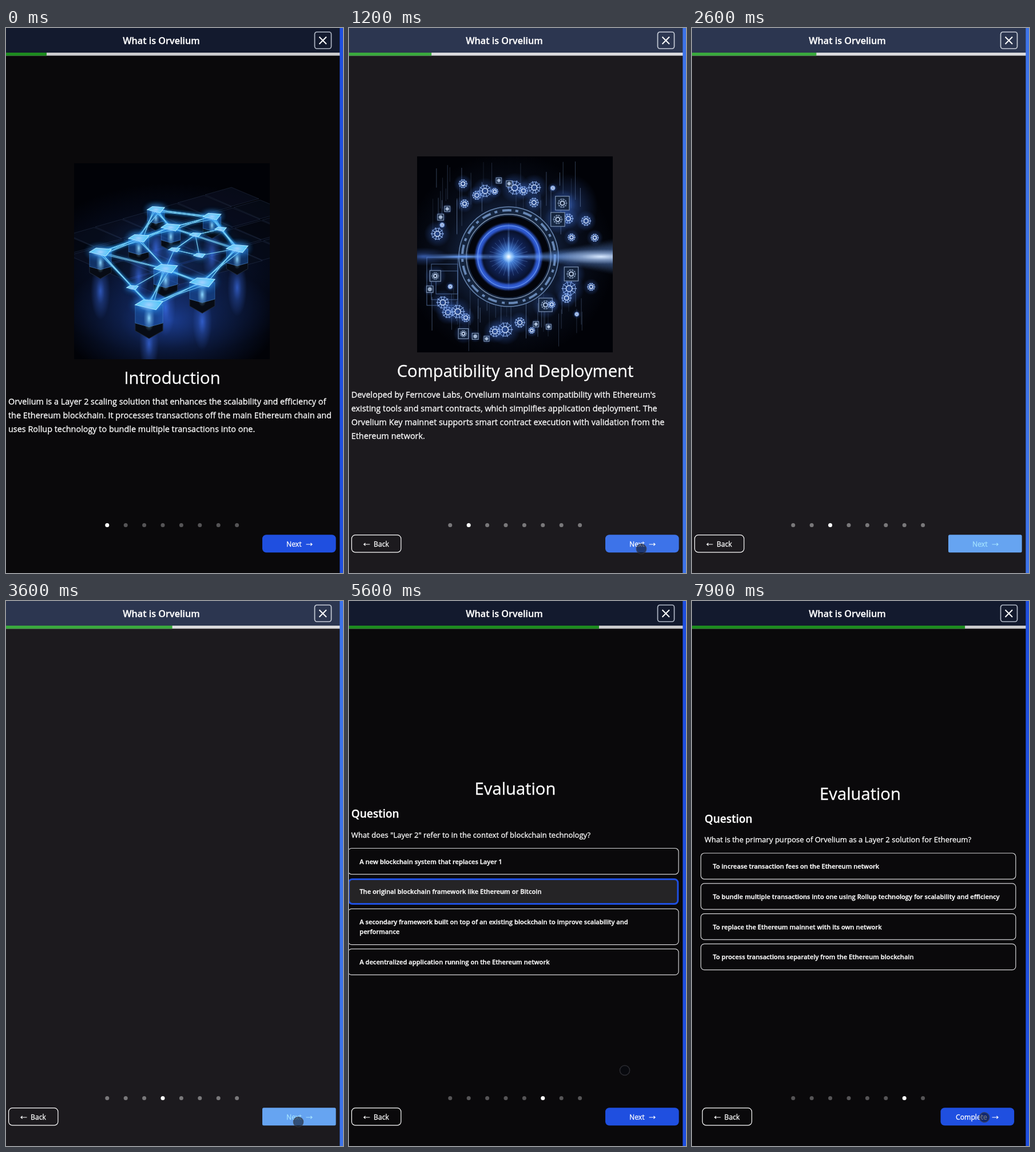
These frames come from a looping animation (589x951 px, 8000 ms). An HTML page with a canvas:

```html
<!DOCTYPE html>
<html lang="en">
<head>
<meta charset="utf-8">
<title>Lesson slides</title>
<style>
html, body { margin: 0; width: 589px; height: 951px; overflow: hidden; }
body { position: relative; background: var(--bg); font-family: "Open Sans", "Noto Sans", sans-serif; }
.slide { position: absolute; left: 0; top: 0; width: 589px; height: 951px; }
.slide canvas { position: absolute; }
svg { position: absolute; left: 0; top: 0; --ink: #fff; }
text { fill: var(--ink); stroke: var(--ink); stroke-width: .3; font-size: 12.2px; }
.title { font-size: 16.2px; font-weight: 600; text-anchor: middle; }
.heading { font-size: 29.2px; text-anchor: middle; }
.body { font-size: 14.42px; }
.sub { font-size: 19px; font-weight: 600; }
.ask { font-size: 13.06px; }
.choice { font-size: 11.15px; font-weight: 600; }
.box { fill: none; stroke: #d4d4d6; stroke-width: 1.2; }
.picked { fill: #252426; stroke: var(--blue); stroke-width: 3; }
.line { fill: none; stroke: var(--ink); stroke-width: 1.2; }
.button { fill: var(--blue); rx: 7px; }
.wait { --ink: #a4e2ff; }
.wait .button { fill: #66a4f1; rx: 2.5px; }
</style>
</head>
<body>
<div class="slide" id="intro"></div>
<div class="slide" id="deploy"></div>
<div class="slide" id="quiz1"></div>
<div class="slide" id="quiz2"></div>
<svg id="ui" width="589" height="951"></svg>
<script>
const $ = id => document.getElementById(id);
const svg = s => `<svg width="589" height="951">${s}</svg>`;
const text = (cls, x, y, s) => `<text class="${cls}" x="${x}" y="${y}">${s}</text>`;
const arrow = (x, dir) => `<path class="line" d="M${x} 901h${10.5 * dir}m${-2.6 * dir} -2.3l${2.6 * dir} 2.3l${-2.6 * dir} 2.3"/>`;
const mix = (a, b, k) => a + (b - a) * k;
const ramp = (t, a, b) => Math.min(1, Math.max(0, (t - a) / (b - a)));
const randomizer = seed => () => (seed = seed * 16807 % 2147483647) / 2147483647;

// ---------- pictures ----------
function picture(top, draw) {
  const c = document.createElement('canvas');
  c.width = c.height = 342;
  c.style.left = '119px';
  c.style.top = top + 'px';
  const g = c.getContext('2d');
  g.fillStyle = '#010207';
  g.fillRect(0, 0, 342, 342);
  g.translate(-119, -top);
  draw(g);
  return c;
}

function glow(g, x, y, rx, ry, color, alpha) {
  g.save();
  g.translate(x, y);
  g.scale(rx, ry);
  const r = g.createRadialGradient(0, 0, 0, 0, 0, 1);
  r.addColorStop(0, `rgba(${color},${alpha})`);
  r.addColorStop(.45, `rgba(${color},${alpha * .4})`);
  r.addColorStop(1, `rgba(${color},0)`);
  g.fillStyle = r;
  g.fillRect(-1, -1, 2, 2);
  g.restore();
}

function poly(g, pts, fill, line) {
  g.beginPath();
  pts.forEach(p => g.lineTo(...p));
  g.closePath();
  if (fill) { g.fillStyle = fill; g.fill(); }
  if (line) { g.strokeStyle = line; g.stroke(); }
}

function ring(g, x, y, r, color, width) {
  g.beginPath();
  g.arc(x, y, r, 0, 7);
  g.strokeStyle = color;
  g.lineWidth = width;
  g.stroke();
}

function segment(g, x1, y1, x2, y2) {
  g.beginPath();
  g.moveTo(x1, y1);
  g.lineTo(x2, y2);
  g.stroke();
}

// Spokes between two radii
function burst(g, x, y, from, to, count) {
  for (let i = 0; i < count; i++) {
    const c = Math.cos(i * 2 * Math.PI / count), s = Math.sin(i * 2 * Math.PI / count);
    segment(g, x + c * from, y + s * from, x + c * to, y + s * to);
  }
}

const points = s => s.split(' ').map(p => p.split(',').map(Number));
const towers = points('262,317 360,329 288,348 232,367 404,385 165,391 279,420 343,444 250,483');
const chips = points('375,351 331,361 294,387 338,397 221,453');

// Distance on the tilted floor
const distance = (p, q) => Math.hypot(p[0] - q[0], 1.6 * (p[1] - q[1]));
const nearest = (p, group) => [...group].sort((a, b) => distance(p, a) - distance(p, b)).slice(1, 4);

function drawNetwork(g) {
  const rnd = randomizer(7);
  // floor
  glow(g, 290, 420, 250, 150, '22,48,115', .7);
  g.lineWidth = 1;
  for (let i = 0; i < 7; i++) for (let j = 0; j < 4; j++) {
    const x = 60 + i * 48 + j * 50, y = 375 - i * 14 + j * 22, v = rnd();
    poly(g, [[x, y], [x + 46, y - 13], [x + 94, y + 7], [x + 46, y + 20]],
      `rgba(${4 + v * 6},${7 + v * 9},${15 + v * 18},.7)`, 'rgba(75,95,130,.25)');
  }
  glow(g, 285, 510, 190, 110, '34,76,180', .75);
  glow(g, 290, 385, 130, 70, '30,80,170', .45);
  towers.forEach(([x, y]) => glow(g, x, y + 68, 17, 50, '65,120,255', .65));
  // columns
  towers.forEach(([x, y]) => {
    const w = 15 + (y - 317) * .055, h = w * 1.6, d = w * .28, base = y + h;
    poly(g, [[x - w, base - d], [x, base], [x + w, base - d], [x + w, base + d], [x, base + 3 * d], [x - w, base + d]], '#070b14', '#202b3d');
    poly(g, [[x - w, y], [x + w, y], [x + w, base - d], [x, base], [x - w, base - d]], 'rgba(25,80,160,.55)', 'rgba(80,150,225,.45)');
    glow(g, x, y + h * .6, w * .4, h * .6, '140,215,255', 1);
  });
  // links
  g.shadowColor = '#2fa5ff';
  g.shadowBlur = 5;
  g.lineWidth = 1.2;
  g.strokeStyle = '#84d7f6';
  const link = (p, q) => segment(g, ...p, ...q);
  towers.forEach(p => nearest(p, towers).forEach(q => {
    link(p, q);
    segment(g, p[0] + 6, p[1] + 4, q[0] - 4, q[1]);
  }));
  chips.forEach(p => nearest(p, [...towers, ...chips]).forEach(q => link(p, q)));
  // plates
  [...towers, ...chips].forEach(([x, y], i) => {
    const a = i < towers.length ? 15 + (y - 317) * .055 : 10, d = a * .36;
    g.shadowBlur = 12;
    poly(g, [[x - a, y], [x - a * .4, y - d], [x + a, y - d * .7], [x + a * .5, y + d]], '#63d5f5', '#b4f3ff');
    g.shadowBlur = 0;
    glow(g, x, y, a * .8, d * 1.3, '235,255,255', 1);
    glow(g, x, y, a * 1.6, a, '50,140,255', .4);
  });
}

function mark(g, x, y, r, framed) {
  glow(g, x, y, r * 2, r * 2, '60,110,215', .65);
  g.lineWidth = 1.2;
  g.strokeStyle = framed ? '#7d92b2' : '#8db0ee';
  if (framed) {
    g.fillStyle = '#14233b';
    g.fillRect(x - r, y - r, 2 * r, 2 * r);
    g.strokeRect(x - r, y - r, 2 * r, 2 * r);
    r *= .7;
  }
  burst(g, x, y, r * .4, r, 10);
  ring(g, x, y, r * .85, g.strokeStyle, 1);
  ring(g, x, y, r * .4, '#cfe0fa', 1.5);
}

function drawPortal(g) {
  const cx = 279, cy = 399, rnd = randomizer(41);
  glow(g, cx, cy, 185, 180, '42,72,130', .6);
  glow(g, 385, 310, 50, 55, '60,110,220', .5);
  // hanging threads
  for (let i = 0; i < 66; i++) {
    const x = 145 + rnd() * 267, y = i % 2 ? 232 + rnd() * 70 : 450 + rnd() * 50;
    g.strokeStyle = `rgba(125,155,200,${.15 + rnd() * .35})`;
    g.lineWidth = 1;
    segment(g, x, y, x, y + 18 + rnd() * 50);
  }
  g.strokeStyle = '#4a658e';
  for (let i = 0; i < 3; i++) g.strokeRect(136 + i * 8, 400 + i * 12, 54 - i * 8, 84 - i * 22);
  // emblems spread around the portal
  for (let i = 0; i < 52; i++) {
    const a = i * 2.4, r = 104 + 52 * rnd(), size = 4 + 10 * rnd() ** 1.5;
    const x = cx + r * Math.cos(a), y = cy + r * Math.sin(a);
    if (Math.abs(y - cy) > 30) mark(g, x, y, size, i % 3 === 0);
  }
  // portal
  glow(g, cx, cy, 112, 112, '50,90,160', .7);
  ring(g, cx, cy, 79, '#15243d', 16);
  ring(g, cx, cy, 87, '#6683ad', 1.6);
  g.setLineDash([16, 7, 5, 9]);
  ring(g, cx, cy, 81, '#6787b5', 4);
  g.setLineDash([]);
  ring(g, cx, cy, 74, '#8094b0', 1.3);
  g.fillStyle = '#02040b';
  g.beginPath();
  g.arc(cx, cy, 71, 0, 7);
  g.fill();
  for (let i = 0; i < 8; i++) ring(g, cx, cy, 47 + i * 1.6, `rgba(55,105,240,${.15 + .45 * Math.sin(i / 7 * Math.PI)})`, 4);
  ring(g, cx, cy, 54, '#6f9cf0', 1.2);
  glow(g, cx, cy, 56, 56, '45,95,235', 1);
  // beam widening to the right
  for (let x = cx; x < 480; x += 6) {
    const k = (x - cx) / 200;
    glow(g, x, cy, 16, 3 + 34 * k ** 1.4, '110,165,255', .35);
  }
  glow(g, 440, cy, 80, 13, '215,232,255', 1);
  glow(g, 200, cy, 95, 6, '110,165,255', 1);
  glow(g, 130, cy, 45, 16, '70,120,230', .6);
  // flare
  g.strokeStyle = 'rgba(140,190,255,.4)';
  g.lineWidth = .7;
  burst(g, cx, cy, 0, 34, 24);
  glow(g, cx, cy, 3, 62, '130,180,255', .9);
  glow(g, cx, cy, 28, 28, '110,190,255', 1);
  glow(g, cx, cy, 11, 11, '255,255,255', 1);
}

// ---------- slides ----------
function article(id, top, draw, heading, lines) {
  const y = top + 385;
  $(id).innerHTML = svg(text('heading', 290.5, y, heading) +
    lines.map((s, i) => text('body', 4, y + 36 + i * 24, s)).join(''));
  $(id).prepend(picture(top, draw));
}

article('intro', 236, drawNetwork, 'Introduction', [
  'Orvelium is a Layer 2 scaling solution that enhances the scalability and efficiency of',
  'the Ethereum blockchain. It processes transactions off the main Ethereum chain and',
  'uses Rollup technology to bundle multiple transactions into one.'
]);
article('deploy', 224, drawPortal, 'Compatibility and Deployment', [
  "Developed by Ferncove Labs, Orvelium maintains compatibility with Ethereum's",
  'existing tools and smart contracts, which simplifies application deployment. The',
  'Orvelium Key mainnet supports smart contract execution with validation from the',
  'Ethereum network.'
]);

function quiz(id, mid, y, textX, box, question, choices, picked) {
  let top = y + 93.5, out = '';
  choices.forEach((c, i) => {
    const lines = c.split('|'), h = 45.3 + (lines.length - 1) * 17.2;
    const inset = i === picked ? 1.2 : 0;
    out += `<rect class="box ${inset ? 'picked' : ''}" x="${box.x + inset}" y="${top + inset}"
      width="${box.w - 2 * inset}" height="${h - 2 * inset}" rx="6"/>`;
    lines.forEach((s, n) => out += text('choice', textX + 14.5, top + 27 + n * 17, s));
    top += h + 7.5;
  });
  $(id).innerHTML = svg(text('heading', mid, y, 'Evaluation') + text('sub', textX, y + 40.3, 'Question') +
    text('ask', textX, y + 74.6, question) + out);
}

quiz('quiz1', 290.5, 338, 4, { x: -1.5, w: 577.5 },
  'What does "Layer 2" refer to in the context of blockchain technology?', [
    'A new blockchain system that replaces Layer 1',
    'The original blockchain framework like Ethereum or Bitcoin',
    'A secondary framework built on top of an existing blockchain to improve scalability and|performance',
    'A decentralized application running on the Ethereum network'
  ], 1);
quiz('quiz2', 294, 346.5, 22, { x: 15.5, w: 550.3 },
  'What is the primary purpose of Orvelium as a Layer 2 solution for Ethereum?', [
    'To increase transaction fees on the Ethereum network',
    'To bundle multiple transactions into one using Rollup technology for scalability and efficiency',
    'To replace the Ethereum mainnet with its own network',
    'To process transactions separately from the Ethereum blockchain'
  ]);

// ---------- frame around the slides ----------
const button = (id, x, label, labelX) => `<g id="${id}">
  <rect class="button" x="${x}" y="884.2" width="128.6" height="31"/>
  ${text('', labelX, 905, label)}${arrow(524.5, 1)}</g>`;

$('ui').innerHTML = `
  <rect width="584" height="43" fill="var(--head)"/>
  <rect y="43" width="584" height="5.3" fill="var(--track)"/>
  <rect id="bar" y="43" height="5.3" fill="var(--green)"/>
  <rect x="583.3" width="6" height="951" fill="var(--blue)"/>
  ${text('title', 271.5, 28, 'What is Orvelium')}
  <rect x="539.5" y="7" width="29" height="29" rx="4" fill="none" stroke="var(--edge)" stroke-width="1.7"/>
  <path d="M547.5 15.5l12.5 12.5m0 -12.5l-12.5 12.5" stroke="#fff" stroke-width="2"/>
  ${[...Array(8)].map((_, i) => `<circle class="dot" cx="${176.8 + 32.4 * i}" cy="867.5" r="3.5"/>`).join('')}
  <g id="back"><rect class="line" x="4.6" y="884.7" width="86.3" height="30.2" rx="6.5"/>
    ${arrow(36.5, -1)}${text('', 43, 905, 'Back')}</g>
  ${button('next', 448, 'Next', 490)}
  ${button('done', 434.5, 'Complete', 461)}
  <circle id="cursor" r="8.6" fill="rgba(8,10,18,.55)" stroke="rgba(62,62,68,.65)" stroke-width="1.5"/>`;

const palette = {
  bg: [10, 9, 11], head: [19, 26, 46], blue: [31, 79, 224], green: [29, 140, 31],
  track: [203, 203, 205], dot: [85, 84, 86], edge: [176, 184, 198]
};
const starts = [0, 300, 2200, 3200, 4200, 5000, 7700];
const visible = { intro: [-300, 300], deploy: [700, 2200], quiz1: [5100, 7500], quiz2: [7600, 8000] };
const dots = document.querySelectorAll('.dot');
const show = (id, v) => $(id).style.opacity = +v;

function render(t) {
  // a gamma curve lifts all colours while light
  const gamma = 1 - .32 * (ramp(t, 200, 400) * (t >= 300) - ramp(t, 4900, 5100));
  for (const name in palette) {
    const rgb = palette[name].map(v => Math.round(255 * (v / 255) ** gamma));
    document.body.style.setProperty('--' + name, `rgb(${rgb})`);
  }
  for (const id in visible) {
    const [from, to] = visible[id];
    show(id, ramp(t, from, from + 250) - ramp(t, to, to + 250));
  }

  const page = starts.filter(s => t >= s).length - 1;
  const since = t - starts[page], first = page === 0, last = page === 6;
  const moved = first ? 1 : ramp(since, 0, 365);
  $('bar').setAttribute('width', 73.2 * (page + moved) - 2.2);
  dots.forEach((d, i) => d.style.fill = i === page ? '#fff' : 'var(--dot)');

  show('back', !first);
  show('next', !last);
  show('done', last);
  $('back').setAttribute('transform', `translate(${last ? 13.6 : 0} 0)`);
  $('next').classList.toggle('wait', !first && since < 600);

  // the pointer leaves the button for the quiz, then returns
  const away = ramp(t, 5100, 5600) - ramp(t, 7400, 7700);
  $('cursor').setAttribute('cx', mix(511, 482, away));
  $('cursor').setAttribute('cy', mix(t < 7400 ? 909 : 901, 819, away));
  show('cursor', t >= 300 && (t < 2300 || t >= 3100));
}

const begin = performance.now();
function tick() {
  const t = (performance.now() - begin) % 8000;
  render(Math.floor(t / 100) * 100);
  requestAnimationFrame(tick);
}
tick();
</script>
</body>
</html>
```
